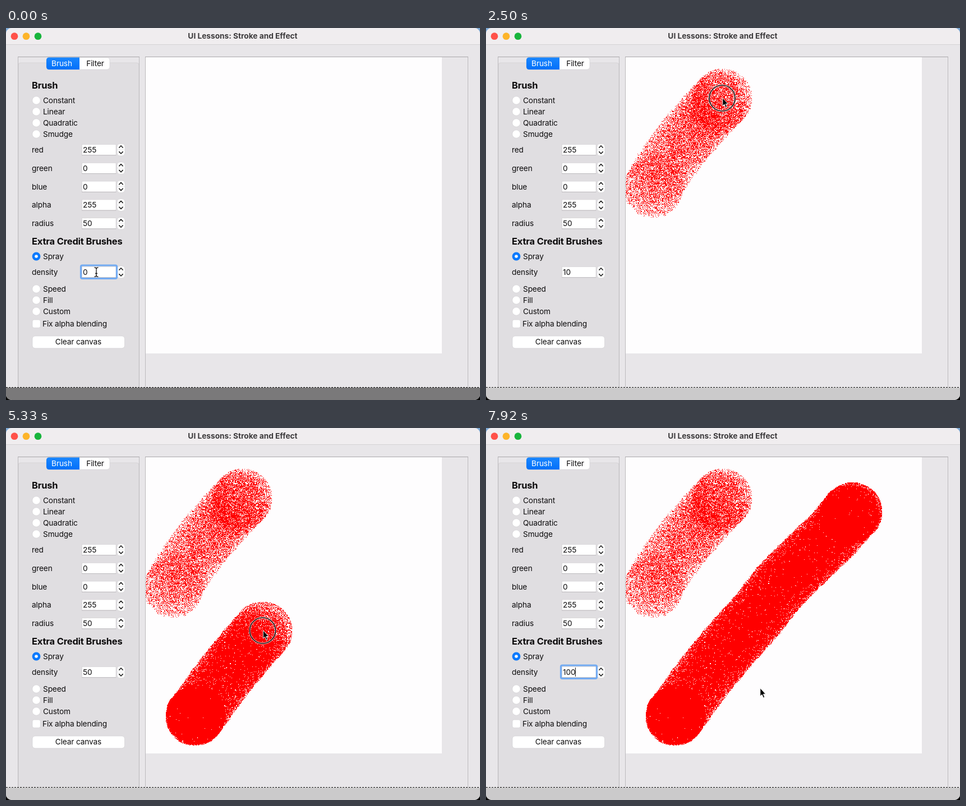
Write an HTML page with a canvas that moves like this. It is 845x663 px and loops after 8000 ms.

```html
<!DOCTYPE html>
<html lang="en">
<head>
<meta charset="utf-8">
<title>Spray brush</title>
<style>
  html, body { margin: 0; width: 100%; height: 100%; overflow: hidden; background: #000; }
  svg, canvas { position: absolute; left: 0; top: 0; }
  #paper { left: 249px; top: 52px; width: 528px; height: 527.5px; image-rendering: pixelated; }
  text { font: 13.7px Inter, "Open Sans", sans-serif; letter-spacing: -.15px; fill: #0c0b0c; white-space: pre; }
  .head { font-size: 16.5px; font-weight: 700; letter-spacing: -.2px; }
  .title { font-size: 13.7px; font-weight: 700; fill: #3d3b3d; letter-spacing: 0; }
  .mid { text-anchor: middle; }
  .ctl { fill: #fff; stroke: #cfcdd0; stroke-width: .6; }
</style>
</head>
<body>
<svg id="ui" width="845" height="663">
  <defs>
    <linearGradient id="blue" x2="0" y2="1">
      <stop stop-color="#1a86ff"/><stop offset="1" stop-color="#0070f8"/>
    </linearGradient>
    <clipPath id="win"><rect width="845" height="663" rx="10"/></clipPath>
  </defs>
  <rect width="845" height="300" fill="#7aa6d3"/>
  <g clip-path="url(#win)">
    <rect width="845" height="663" fill="#e8e6e9"/>
    <rect width="845" height="29" fill="#f0edef"/>
    <rect y="29" width="845" height="1" fill="#d5d2d5"/>
    <circle cx="15" cy="14.7" r="6.4" fill="#ff5149"/>
    <circle cx="36" cy="14.7" r="6.4" fill="#fdb429"/>
    <circle cx="57" cy="14.7" r="6.4" fill="#17b43c"/>
    <text class="title mid" x="422" y="19">UI Lessons: Stroke and Effect</text>

    <path d="M22 640V66q0-4 4-4H233q4 0 4 4V640Z" fill="#e0dee1" stroke="#d3d1d4" stroke-width=".8"/>
    <path d="M21.5 640V51.5H237.5V640M248.500 640V51.5H823.5V640" fill="none" stroke="#bcbabd"/>
    <path d="M21 51.5H238M248 51.5H824" stroke="#a9a7aa"/>

    <rect class="ctl" x="72" y="52.500" width="113" height="21.5" rx="5"/>
    <path d="M131 52.500V74H77q-5 0-5-5V57.500q0-5 5-5Z" fill="url(#blue)"/>
    <text class="mid" x="99.5" y="68" style="fill:#fff">Brush</text>
    <text class="mid" x="159" y="68">Filter</text>

    <text class="head" x="46" y="108">Brush</text>
    <text class="head" x="46" y="386">Extra Credit Brushes</text>
    <g id="controls"></g>
    <rect class="ctl" x="47" y="520" width="14.300" height="14.300" rx="3"/>
    <text x="65" y="532">Fix alpha blending</text>
    <rect class="ctl" x="47" y="549" width="164.500" height="21.800" rx="5"/>
    <text class="mid" x="129" y="564">Clear canvas</text>

    <rect id="focus" x="133.500" y="423" width="64" height="23.500" rx="2.500" fill="none" stroke="#73abf2" stroke-width="3.2"/>
    <rect id="mark" x="137" y="427.500" height="15" fill="#c4e79b"/>
    <text id="value" x="137" y="440"></text>
    <rect id="caret" y="427" width="1" height="16" fill="#111"/>

    <rect id="strip" y="640" width="845" height="23"/>
    <path d="M0 640.5H845" stroke="#fff"/>
    <path d="M0 640.5H845" stroke="#000" stroke-dasharray="3 2"/>
  </g>
</svg>
<canvas id="paper" width="500" height="500"></canvas>
<svg width="845" height="663">
  <g id="mouse" fill="none">
    <g id="ring">
      <circle r="23" stroke="#fff" stroke-opacity=".7" stroke-width="3.4"/>
      <circle r="23" stroke="#111" stroke-width="1.7"/>
    </g>
    <path id="arrow" d="M.8 -.5V14L4 11.200L6.300 16.800L8.700 15.800L6.400 10.300H10.600Z" fill="#000" stroke="#fff" stroke-width="1"/>
    <path id="beam" d="M-3.500 -8.200Q0 -8.200 0 -6Q0 -8.200 3.500 -8.200M0 -6.500V6.500M-3.500 8.200Q0 8.200 0 6Q0 8.200 3.500 8.200M-2 2.500H2" stroke="#111" stroke-width="1.300"/>
  </g>
</svg>
<script>
const $ = id => document.getElementById(id);
const LOOP = 8000, FPS = 12;

// Static controls
const radio = (label, y, on) =>
  `<circle class="ctl" cx="54" cy="${y}" r="7.2"/>` +
  (on ? `<circle cx="54" cy="${y}" r="7.4" fill="#0a7aff"/><circle cx="54" cy="${y}" r="2.8" fill="#fff"/>` : "") +
  `<text x="66" y="${y + 5}">${label}</text>`;

const spin = (label, y, value) =>
  `<text x="46" y="${y + 5}">${label}</text>
   <rect class="ctl" x="135.500" y="${y - 9.5}" width="60.500" height="19"/>
   <path d="M135 ${y + 9.7}H196.500" stroke="#b5b3b6" stroke-width=".8"/>
   <text x="137" y="${y + 5}">${value}</text>
   <rect class="ctl" x="198" y="${y - 10.8}" width="14" height="21.6" rx="5.500"/>
   <path d="M198.500 ${y}H211.500" stroke="#dddbde" stroke-width=".7"/>
   <path d="M201.800 ${y - 3.8}l3.200 -3.400l3.200 3.400M201.800 ${y + 3.6}l3.200 3.400l3.200 -3.400"
     fill="none" stroke="#222" stroke-width="1.600" stroke-linecap="round" stroke-linejoin="round"/>`;

$("controls").innerHTML =
  ["Constant", "Linear", "Quadratic", "Smudge"].map((s, i) => radio(s, 129 + 20 * i)).join("") +
  [["red", 255], ["green", 0], ["blue", 0], ["alpha", 255], ["radius", 50]]
    .map(([s, v], i) => spin(s, 217 + 32.8 * i, v)).join("") +
  radio("Spray", 407, true) + spin("density", 435, "") +
  ["Speed", "Fill", "Custom"].map((s, i) => radio(s, 465 + 20 * i)).join("");

// Timeline, in steps of 1/12 s
const path = [
  [0, 161, 435], [11, 161, 435], [13, 188, 438], [16, 285, 320], [17, 297, 288],
  [20, 300, 279], [22, 312, 255], [24, 357, 195], [27, 408, 138], [29, 421, 125], [32, 421, 125],
  [36, 160, 435], [37, 160, 435], [40, 127.5, 428.5], [50, 127.5, 428.5],
  [55, 325, 500], [57, 336.5, 513], [60, 336.5, 513], [61.5, 339, 510], [62.5, 390, 440],
  [63.5, 435, 386], [64.5, 480, 336], [65.5, 522, 282], [66.3, 559, 245], [67.5, 615, 192],
  [68.2, 646, 155], [68.8, 648, 153], [69, 651, 149], [70, 653.5, 149], [77, 653.5, 149],
  [82, 168, 436], [83, 160, 435], [85, 130, 431], [88, 130, 431], [94, 488, 464], [96, 488, 464]
];
const typed = [[0, "0"], [8, "1"], [10, "10"], [48, "5"], [49, "50"], [87, "1"], [88, "10"], [89, "100"]];
const presses = [[18, 31], [37, 41], [57, 74], [83, 85]];
const focused = [[0, 18], [37, 57], [83, 96]];
const selected = [[38, 48], [84, 87]];
const within = (spans, n) => spans.some(([a, b]) => n >= a && n < b);

function mouseAt(n) {
  const i = Math.max(1, path.findIndex(p => p[0] >= n));
  const [a, x, y] = path[i - 1], [b, x2, y2] = path[i];
  const k = (n - a) / (b - a);
  return [x + (x2 - x) * k, y + (y2 - y) * k];
}

// Each pixel keeps the step at which the spray first reaches it
let seed = 20;
function rand() {
  seed = (seed + 0x6D2B79F5) | 0;
  let r = Math.imul(seed ^ (seed >>> 15), 1 | seed);
  r = (r + Math.imul(r ^ (r >>> 7), 61 | r)) ^ r;
  return ((r ^ (r >>> 14)) >>> 0) / 4294967296;
}
const SIZE = 500, RADIUS = 50, SCALE = 1.056;
const hit = new Float32Array(SIZE * SIZE).fill(Infinity);

function dab(n, density) {
  const [mx, my] = mouseAt(n);
  const cx = Math.round((mx - 249) / SCALE), cy = Math.round((my - 52) / SCALE);
  for (let y = -RADIUS; y <= RADIUS; y++)
    for (let x = -RADIUS; x <= RADIUS; x++) {
      const px = cx + x, py = cy + y;
      if (x * x + y * y >= RADIUS * RADIUS || rand() > density) continue;
      if (px < 0 || py < 0 || px >= SIZE || py >= SIZE) continue;
      const i = py * SIZE + px;
      if (hit[i] > n) hit[i] = n;
    }
}
function spray(from, to, perStep, density) {
  for (let n = from; n < to; n += 1 / perStep) dab(n, density);
}
spray(18, 22, 1.5, .09);
spray(22, 28, 3, .09);
spray(28, 31, 2, .09);
dab(57, .45);
spray(60.2, 69, 5, .45);
spray(69.5, 72, 1, .45);

const ctx = $("paper").getContext("2d");
const image = ctx.createImageData(SIZE, SIZE);
const pixels = new Uint32Array(image.data.buffer);

const show = (id, on) => $(id).setAttribute("visibility", on ? "visible" : "hidden");

function draw(n) {
  for (let i = 0; i < hit.length; i++) pixels[i] = hit[i] <= n ? 0xff0000ff : 0xfffefdfe;
  ctx.putImageData(image, 0, 0);

  const [x, y] = mouseAt(n);
  const overField = x > 120 && x < 199 && Math.abs(y - 435) < 13;
  $("mouse").setAttribute("transform", `translate(${x} ${y})`);
  show("ring", within(presses, n));
  show("beam", overField);
  show("arrow", !overField);

  const value = $("value");
  value.textContent = typed.filter(k => k[0] <= n).pop()[1];
  const width = value.getComputedTextLength();
  const focus = within(focused, n), sel = within(selected, n);
  show("focus", focus);
  show("mark", sel);
  show("caret", focus && !sel && n >= 8);
  $("mark").setAttribute("width", width);
  $("caret").setAttribute("x", 136.5 + width);

  const grey = Math.round(122 + 81 * Math.min(1, n / 6));
  $("strip").setAttribute("fill", `rgb(${grey},${grey - 1},${grey})`);
}

let last = -1;
const start = performance.now();
function tick() {
  const t = (performance.now() - start) % LOOP;
  const n = Math.min(95, Math.floor(t * FPS / 1000 + .06));
  if (n !== last) draw(last = n);
  requestAnimationFrame(tick);
}
tick();
</script>
</body>
</html>
```
